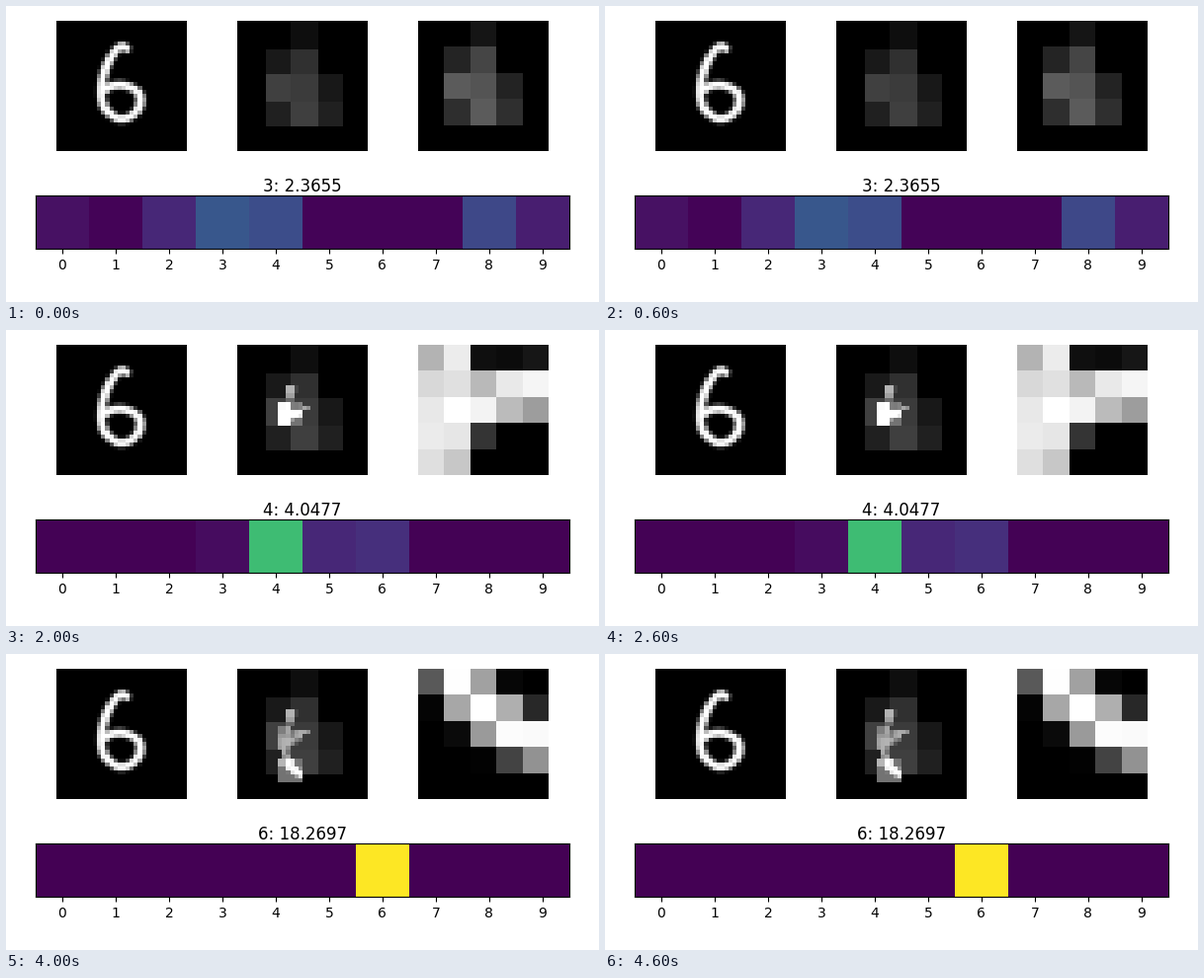
These frames come from a looping animation (600x300 px, 5 s). A matplotlib script:

```python
import numpy as np
import matplotlib.pyplot as plt
from matplotlib.animation import FuncAnimation

W, H = 600, 300
N, CELLS, WIN = 32, 5, 6  # image size, glimpse size, window size

# Key points of the pen stroke, in image pixels
PEN = np.array([
    (17.3, 6.8), (16.0, 6.2), (14.4, 7.4), (12.6, 10.5), (11.3, 14.5),
    (11.1, 18.8), (12.2, 21.8), (15.4, 24.1), (18.8, 23.1), (20.6, 20.2),
    (19.8, 17.3), (16.4, 15.8), (13.2, 16.1), (11.6, 17.3),
])

# Window corner and size, best score, main class probabilities
STEPS = [
    ((0, 0, N), 2.3655,
     {0: 0.045, 2: 0.11, 3: 0.27, 4: 0.235, 8: 0.215, 9: 0.085}),
    ((12, 10, WIN), 3.4124,
     {2: 0.05, 3: 0.54, 4: 0.205, 5: 0.075, 8: 0.075}),
    ((10, 14, WIN), 4.0477, {3: 0.035, 4: 0.69, 5: 0.11, 6: 0.135}),
    ((9, 17, WIN), 9.6600, {6: 1}),
    ((10, 22, WIN), 18.2697, {6: 1}),
]


def spline(pts, steps=10):
    """Catmull-Rom curve through the points."""
    p = np.vstack([pts[:1], pts, pts[-1:]])
    t = np.linspace(0, 1, steps, endpoint=False)[:, None]
    parts = []
    for a, b, c, d in zip(p, p[1:], p[2:], p[3:]):
        parts.append(b + t * (c - a) / 2
                     + t ** 2 * (a - 2.5 * b + 2 * c - d / 2)
                     + t ** 3 * (1.5 * (b - c) + (d - a) / 2))
    return np.vstack(parts + [pts[-1:]])


CURVE = spline(PEN)


def sample(x, y, size, n, sub=6):
    """Mean ink in an n x n grid laid over a square of the drawing."""
    s = (np.arange(n * sub) + 0.5) * size / (n * sub)
    gx, gy = np.meshgrid(x + s, y + s)
    dist2 = np.full(gx.shape, 1e4)
    for px, py in CURVE:
        np.minimum(dist2, (gx - px) ** 2 + (gy - py) ** 2, out=dist2)
    ink = np.clip((1.3 - np.sqrt(dist2)) / 0.6, 0, 1)
    return ink.reshape(n, sub, n, sub).mean(axis=(1, 3))


def look(x, y, size):
    # Low windows read slightly above the place where they are shown
    return sample(x, y - 0.1 * max(0, y - 10), size, CELLS)


GLIMPSES = [look(*window) for window, _, _ in STEPS]


def memory(i):
    """Dimmed trace of all glimpses so far, with the current window lit."""
    seen = np.zeros((N, N))
    for k in range(i + 1):
        x, y, size = STEPS[k][0]
        idx = np.arange(size) * CELLS // size
        patch = GLIMPSES[k][np.ix_(idx, idx)]
        part = seen[y:y + size, x:x + size]
        if k == i and k > 0:
            part[:] = np.clip(0.45 + 0.75 * patch, 0, 1)
        else:
            np.maximum(part, 0.7 * patch, out=part)
    return seen


def probs(i):
    """Main classes as given; the others share what is left."""
    main = STEPS[i][2]
    rest = (1 - sum(main.values())) / (10 - len(main))
    return np.array([[main.get(d, rest) for d in range(10)]])


def panel(x, y, w, h):
    return fig.add_axes([x / W, 1 - (y + h) / H, w / W, h / H])


def show(ax, data, cmap="gray"):
    return ax.imshow(data, cmap=cmap, vmin=0, vmax=1, aspect="auto",
                     interpolation="nearest")


plt.rcParams["font.family"] = "DejaVu Sans"
fig = plt.figure(figsize=(W / 100, H / 100), dpi=100, facecolor="white")

views = []
for left, data in ((51, sample(0, 0, N, N)), (234, memory(0)),
                   (416.6, GLIMPSES[0])):
    ax = panel(left, 15, 132, 132)
    ax.axis("off")
    views.append(show(ax, data))

bar_ax = panel(29.9, 192.4, 540, 54)
bar = show(bar_ax, probs(0), "viridis")
bar_ax.set_xticks(range(10))
bar_ax.set_yticks([])
title = fig.text(299.9 / W, 1 - 188.4 / H, "", size=12, ha="center",
                 va="baseline")


def update(i):
    p = probs(i)
    views[1].set_data(memory(i))
    views[2].set_data(GLIMPSES[i])
    bar.set_data(p)
    title.set_text(f"{p.argmax()}: {STEPS[i][1]:.4f}")
    return views[1], views[2], bar, title


anim = FuncAnimation(fig, update, frames=len(STEPS), interval=1000,
                     repeat=True, repeat_delay=0, blit=False)
plt.show()
```
